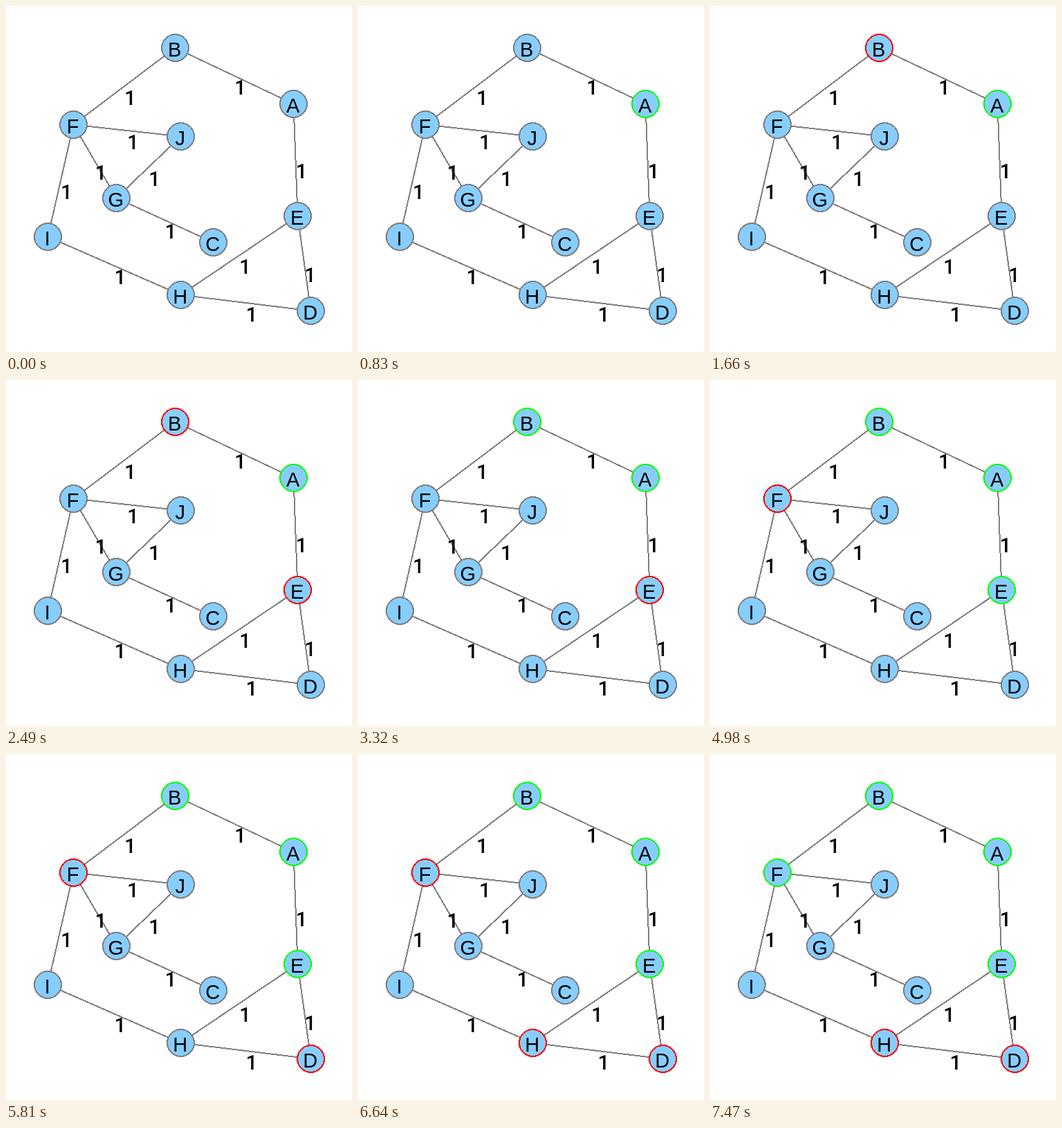
Write an HTML page that moves like this. It is 500 px wide and 500 px high and loops after 8 s.

```html
<!DOCTYPE html>
<html lang="en">
<head>
<meta charset="utf-8">
<title>Graph traversal</title>
<style>
  html, body { margin: 0; width: 100%; height: 100%; overflow: hidden; background: #fff; }
  svg { display: block; width: 100vw; height: 100vh; }
  line, circle { shape-rendering: crispEdges; stroke: #808080; stroke-width: 2; }
  circle { fill: #87ceff; }
  text { font: 29px "Liberation Sans", Arial, sans-serif; fill: #000; }
  .node { text-anchor: middle; }
  .weight { font-family: Roboto, sans-serif; font-weight: 500; }
</style>
</head>
<body>
<svg id="stage" viewBox="0 0 500 500"></svg>
<script>
const LOOP = 8000, STEP = 830;
const RED = '#ff0000', GREEN = '#00ff00', GRAY = '#808080';

const nodes = {
  A: [415.5, 141.5], B: [244.5, 60.5], C: [299.5, 341.5], D: [440.5, 440.5],
  E: [421.5, 303.5], F: [97.5, 171.5], G: [159.5, 277.5], H: [252.5, 417.5],
  I: [60.5, 333.5], J: [252.5, 188.5]
};
const edges = ['AB', 'AE', 'BF', 'FJ', 'FG', 'FI', 'GJ', 'GC', 'IH', 'EH', 'ED', 'HD'];

// One visit or discovery per step, starting after the first.
const steps = [
  ['A', GREEN], ['B', RED], ['E', RED], ['B', GREEN], ['F', RED],
  ['E', GREEN], ['D', RED], ['H', RED], ['F', GREEN]
];

const stage = document.getElementById('stage');

function add(tag, attrs, label) {
  const el = document.createElementNS('http://www.w3.org/2000/svg', tag);
  for (const key in attrs) el.setAttribute(key, attrs[key]);
  if (label) el.textContent = label;
  return stage.appendChild(el);
}

for (const [a, b] of edges) {
  const [x1, y1] = nodes[a], [x2, y2] = nodes[b];
  add('line', { x1, y1, x2, y2 });
}

const rings = {};
for (const name in nodes) {
  const [cx, cy] = nodes[name];
  rings[name] = add('circle', { cx, cy, r: 19.4 });
  add('text', { class: 'node', x: cx - 0.8, y: cy + 12.7 }, name);
}

for (const [a, b] of edges) {
  const [x1, y1] = nodes[a], [x2, y2] = nodes[b];
  add('text', { class: 'weight', x: (x1 + x2) / 2 + 0.3, y: (y1 + y2) / 2 + 26.8 }, '1');
}

let shown = -1;
function draw(now) {
  const count = Math.floor((now % LOOP) / STEP);
  if (count !== shown) {
    shown = count;
    const colors = Object.fromEntries(steps.slice(0, count));
    for (const name in rings) rings[name].style.stroke = colors[name] || GRAY;
  }
}

const start = performance.now();
function tick() {
  draw(performance.now() - start);
  requestAnimationFrame(tick);
}
tick();
</script>
</body>
</html>
```
